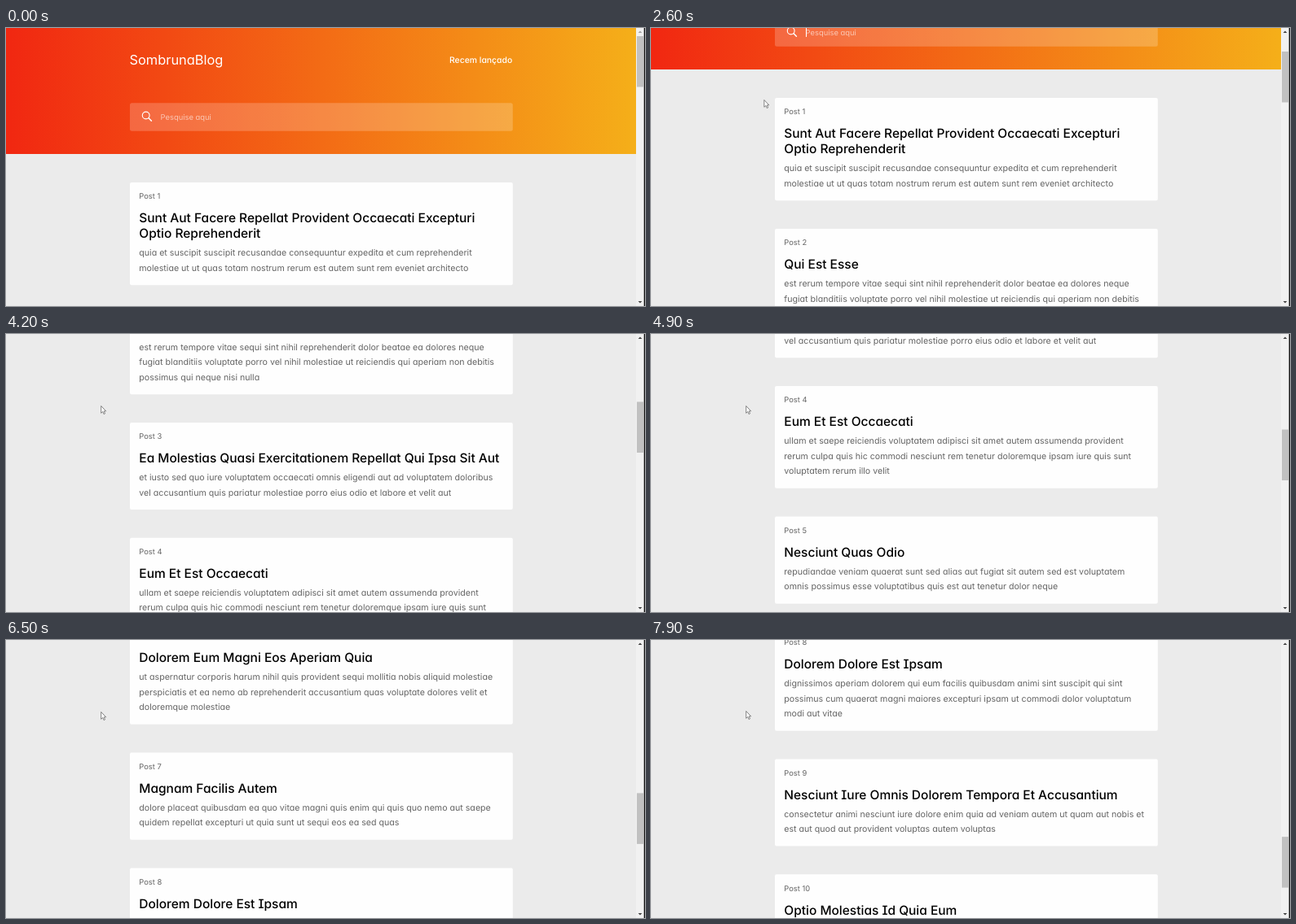
These frames come from a looping animation (784 px wide and 342 px high, 8000 ms). An HTML page:

```html
<!DOCTYPE html>
<html lang="pt">
<head>
<meta charset="utf-8">
<title>Blog</title>
<style>
  html, body { margin: 0; width: 100%; height: 100%; overflow: hidden; background: #ebebeb; }
  svg { display: block; width: 784px; height: 342px; }
  text {
    font-family: Inter, "Open Sans", sans-serif;
    font-feature-settings: "cv11" 1, "cv08" 1;
    text-rendering: geometricPrecision;
    white-space: pre;
  }
  .logo { font-size: 16.4px; fill: #fff; }
  .link { font-size: 10.4px; font-weight: 500; fill: #fff; }
  .hint { font-size: 9.4px; fill: #fff; fill-opacity: .6; }
  .label { font-size: 9.35px; fill: #646464; }
  .title { font-size: 15.49px; font-weight: 500; fill: #000; }
  .body { font-size: 10.63px; fill: #646464; }
</style>
</head>
<body>
<svg viewBox="0 0 784 342">
  <defs>
    <linearGradient id="flare">
      <stop offset="0" stop-color="#f12711"/>
      <stop offset="1" stop-color="#f5af19"/>
    </linearGradient>
  </defs>
  <rect width="784" height="342" fill="#ebebeb"/>
  <g id="page">
    <rect width="773" height="155" fill="url(#flare)"/>
    <text class="logo" x="151.5" y="45">SombrunaBlog</text>
    <text class="link" x="544" y="42.6">Recem lançado</text>
    <rect x="152" y="92.3" width="469.8" height="34.4" rx="2.5" fill="#fff" fill-opacity=".2"/>
    <g fill="none" stroke="#fff" stroke-width="1.1" stroke-linecap="round">
      <circle cx="171.7" cy="107.5" r="4.4"/>
      <path d="M175 110.8l3.4 3.4" stroke-width="1.5"/>
    </g>
    <text class="hint" x="189.6" y="112.8">Pesquise aqui</text>
    <rect id="caret" x="190" y="104" width="1" height="11" fill="#fff"/>
  </g>
  <g id="bar">
    <rect x="773" width="11" height="342" fill="#f1f1f1"/>
    <path id="up" d="M775.6 6l2.4-2.6 2.4 2.6z"/>
    <path d="M775.6 336l2.4 2.6 2.4-2.6z" fill="#404040"/>
    <rect id="thumb" x="774" width="8" height="62.5" fill="#c1c1c1"/>
    <rect x="782.7" width="1.3" height="342" fill="#111"/>
  </g>
  <path id="arrow" d="M.5 .5v8.8l2-1.8 1.4 3.1 1.4-.7-1.4-3h2.6z"
        fill="#fff" stroke="#666" stroke-width=".8" stroke-linejoin="round"/>
</svg>
<script>
const $ = id => document.getElementById(id);
const LOOP = 8000, TICK = 100;
const NOTCH = 57.5, GLIDE = 250;

// title lines, body lines
const posts = [
  [["Sunt Aut Facere Repellat Provident Occaecati Excepturi", "Optio Reprehenderit"],
   ["quia et suscipit suscipit recusandae consequuntur expedita et cum reprehenderit",
    "molestiae ut ut quas totam nostrum rerum est autem sunt rem eveniet architecto"]],
  [["Qui Est Esse"],
   ["est rerum tempore vitae sequi sint nihil reprehenderit dolor beatae ea dolores neque",
    "fugiat blanditiis voluptate porro vel nihil molestiae ut reiciendis qui aperiam non debitis",
    "possimus qui neque nisi nulla"]],
  [["Ea Molestias Quasi Exercitationem Repellat Qui Ipsa Sit Aut"],
   ["et iusto sed quo iure voluptatem occaecati omnis eligendi aut ad voluptatem doloribus",
    "vel accusantium quis pariatur molestiae porro eius odio et labore et velit aut"]],
  [["Eum Et Est Occaecati"],
   ["ullam et saepe reiciendis voluptatem adipisci sit amet autem assumenda provident",
    "rerum culpa quis hic commodi nesciunt rem tenetur doloremque ipsam iure quis sunt",
    "voluptatem rerum illo velit"]],
  [["Nesciunt Quas Odio"],
   ["repudiandae veniam quaerat sunt sed alias aut fugiat sit autem sed est voluptatem",
    "omnis possimus esse voluptatibus quis est aut tenetur dolor neque"]],
  [["Dolorem Eum Magni Eos Aperiam Quia"],
   ["ut aspernatur corporis harum nihil quis provident sequi mollitia nobis aliquid molestiae",
    "perspiciatis et ea nemo ab reprehenderit accusantium quas voluptate dolores velit et",
    "doloremque molestiae"]],
  [["Magnam Facilis Autem"],
   ["dolore placeat quibusdam ea quo vitae magni quis enim qui quis quo nemo aut saepe",
    "quidem repellat excepturi ut quia sunt ut sequi eos ea sed quas"]],
  [["Dolorem Dolore Est Ipsam"],
   ["dignissimos aperiam dolorem qui eum facilis quibusdam animi sint suscipit qui sint",
    "possimus cum quaerat magni maiores excepturi ipsam ut commodi dolor voluptatum",
    "modi aut vitae"]],
  [["Nesciunt Iure Omnis Dolorem Tempora Et Accusantium"],
   ["consectetur animi nesciunt iure dolore enim quia ad veniam autem ut quam aut nobis et",
    "est aut quod aut provident voluptas autem voluptas"]],
  [["Optio Molestias Id Quia Eum"], ["", ""]]
];

function add(tag, attrs, text = "") {
  const el = document.createElementNS("http://www.w3.org/2000/svg", tag);
  for (const k in attrs) el.setAttribute(k, attrs[k]);
  el.textContent = text;
  $("page").append(el);
}

function buildPosts() {
  let top = 189.9;
  posts.forEach(([titles, lines], i) => {
    const extra = (titles.length - 1) * 19.2;
    const height = 70.2 + extra + lines.length * 18.5;
    const write = (cls, dy, s) => add("text", { class: cls, x: 163.3, y: top + dy }, s);
    add("rect", { x: 152, y: top, width: 469.8, height, rx: 2, fill: "#fefefe" });
    write("label", 20.4, "Post " + (i + 1));
    titles.forEach((s, n) => write("title", 49.3 + n * 19.2, s));
    lines.forEach((s, n) => write("body", 71.1 + extra + n * 18.5, s));
    top += height + 34.7;
  });
}

// start times of the wheel notches
const wheel = [2100, 2420, 2940, 3300, 3500, 3720, 3940, 4400, 4550, 4700, 4800, 4940,
  5330, 5600, 5680, 5740, 6240, 6700, 6900, 7100, 7280, 7440, 7846];

const ease = p => { p = Math.min(1, Math.max(0, p)); return p * p * (3 - 2 * p); };
const scrollAt = t => NOTCH * wheel.reduce((sum, at) => sum + ease((t - at) / GLIDE), 0);

// time, x, y of the pointer
const path = [
  [100, 443, 262], [200, 388, 178], [300, 275, 86], [400, 192, 33], [500, 192, 33],
  [700, 145, 38], [900, 290, 48], [1200, 567, 34], [1400, 400, 67], [2099, 400, 67],
  [2100, 147.8, 88], [2200, 147.8, 88], [2700, 136, 88], [2900, 136, 88],
  [3300, 129, 88], [3800, 116.2, 88], [6700, 116.2, 88], [7600, 116.2, 87], [8000, 116.2, 87]
];

function pointerAt(t) {
  if (t < 100 || (t >= 1500 && t < 2100)) return null;
  const i = Math.max(1, path.findIndex(k => k[0] >= t));
  const [t0, x0, y0] = path[i - 1], [t1, x1, y1] = path[i];
  const p = (t - t0) / (t1 - t0);
  return [x0 + (x1 - x0) * p, y0 + (y1 - y0) * p];
}

function draw(now) {
  const t = Math.floor((now % LOOP) / TICK) * TICK;
  const y = scrollAt(t), at = pointerAt(t);
  $("page").setAttribute("transform", `translate(0 ${-y})`);
  $("thumb").setAttribute("y", 10 + y * 0.1825);
  $("up").setAttribute("fill", y > 0 ? "#404040" : "#a3a3a3");
  $("caret").setAttribute("visibility", t >= 1700 ? "visible" : "hidden");
  $("arrow").setAttribute("visibility", at ? "visible" : "hidden");
  if (at) $("arrow").setAttribute("transform", `translate(${at})`);
}

buildPosts();
let start;
function loop(now) {
  start ??= now;
  draw(now - start);
  requestAnimationFrame(loop);
}
draw(0);
requestAnimationFrame(loop);
</script>
</body>
</html>
```
